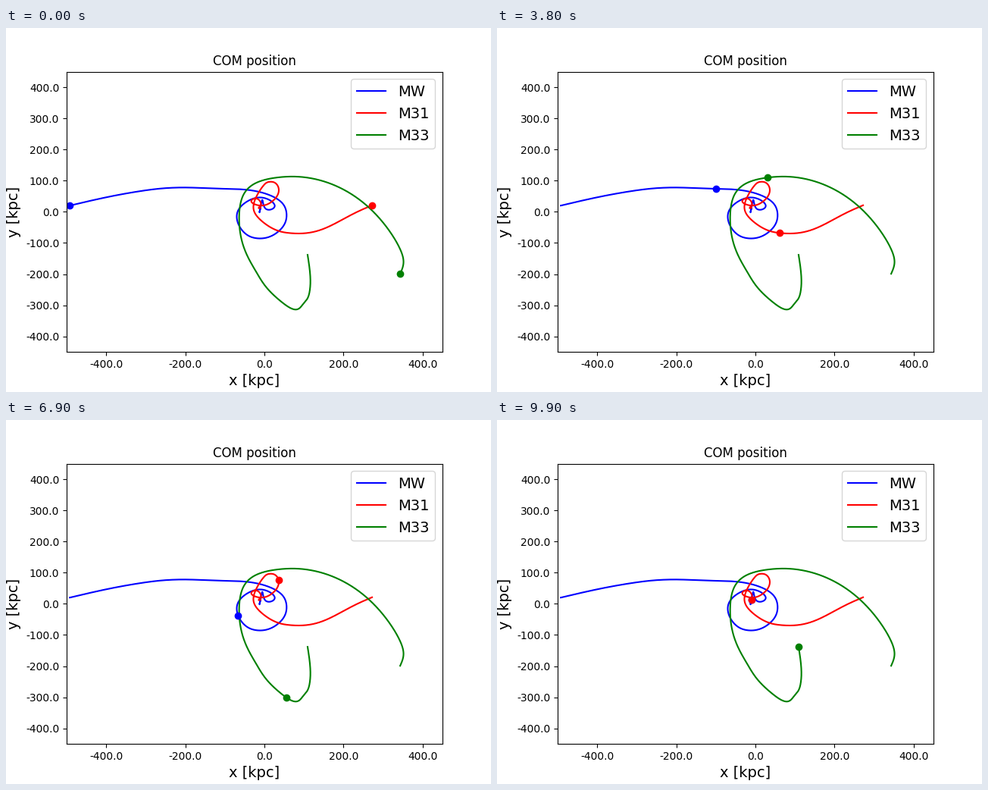
A matplotlib script that plays this animation: 640x480 px, repeating every 10 s.

```python
import numpy as np
import matplotlib.pyplot as plt
from matplotlib.animation import FuncAnimation
from matplotlib.ticker import FormatStrFormatter

plt.rcParams["text.kerning_factor"] = 6

STEPS = 100

# A few waypoints per galaxy: (step, x, y) in kpc
ORBITS = {
    "MW": ("blue", [
        (0, -492, 20), (22, -311, 67), (32, -197, 78), (38, -100, 74),
        (43, -4, 61), (46, 47, 25), (48, 56, -11), (52, 38, -60),
        (60, -19, -85), (66, -54, -63), (71, -70, -17), (75, -52, 26),
        (78, -8, 46), (81, 26, 20), (84, 4, 9), (87, -5, 38),
        (90, -10, 16), (99, -10, 13)]),
    "M31": ("red", [
        (0, 272, 21), (12, 219, -10), (22, 165, -46), (38, 62, -68),
        (43, 13, -48), (46, -19, -14), (50, -26, 31), (55, -4, 82),
        (60, 11, 96), (66, 29, 91), (71, 36, 65), (75, 21, 35),
        (78, -9, 20), (80.5, -33, 32), (83, -22, 43), (86, -9, 28),
        (89, -12, 17), (99, -10, 13)]),
    "M33": ("green", [
        (0, 343, -199), (5, 351, -169), (11, 344, -123), (22, 263, 15),
        (33, 117, 108), (38, 31, 110), (41, -27, 89), (43, -53, 55),
        (46, -64, -23), (55, -25, -184), (60, 2, -238), (66, 40, -286),
        (78, 89, -309), (82, 99, -294), (87.5, 112, -268), (91, 116, -233),
        (99, 109, -138)]),
}


def spline(keys, t):
    """Natural cubic spline through the waypoints, evaluated at steps t."""
    k = np.array(keys, float)
    s, p = k[:, 0], k[:, 1:]
    h = np.diff(s)
    slope = np.diff(p, axis=0) / h[:, None]
    A, b = np.eye(len(s)), np.zeros_like(p)
    for i in range(1, len(s) - 1):
        A[i, i - 1:i + 2] = h[i - 1], 2 * (h[i - 1] + h[i]), h[i]
        b[i] = 6 * (slope[i] - slope[i - 1])
    m = np.linalg.solve(A, b)

    i = np.clip(np.searchsorted(s, t, side="right") - 1, 0, len(h) - 1)
    w = h[i][:, None]
    left, right = (t - s[i])[:, None], (s[i + 1] - t)[:, None]
    return ((m[i] * right ** 3 + m[i + 1] * left ** 3) / (6 * w)
            + (p[i] / w - m[i] * w / 6) * right
            + (p[i + 1] / w - m[i + 1] * w / 6) * left)


fig, ax = plt.subplots(figsize=(6.4, 4.8), dpi=100)
fine = np.linspace(0, STEPS - 1, 991)
for name, (color, keys) in ORBITS.items():
    ax.plot(*spline(keys, fine).T, color=color, label=name)

tracks = [spline(keys, np.arange(STEPS)) for _, keys in ORBITS.values()]
dots = [ax.plot([], [], "o", color=color)[0] for color, _ in ORBITS.values()]

ax.set(xlim=(-500, 450), ylim=(-450, 450), title="COM position")
ax.set_xlabel("x [kpc]", fontsize=14)
ax.set_ylabel("y [kpc]", fontsize=14)
ax.set_xticks(range(-400, 401, 200))
ax.set_yticks(range(-400, 401, 100))
for axis in (ax.xaxis, ax.yaxis):
    axis.set_major_formatter(FormatStrFormatter("%.1f"))
ax.legend(loc="upper right", fontsize=14)


def update(n):
    for dot, track in zip(dots, tracks):
        dot.set_data(track[n:n + 1, 0], track[n:n + 1, 1])
    return dots


anim = FuncAnimation(fig, update, frames=STEPS, interval=100,
                     repeat=True, repeat_delay=0)
plt.show()
```
